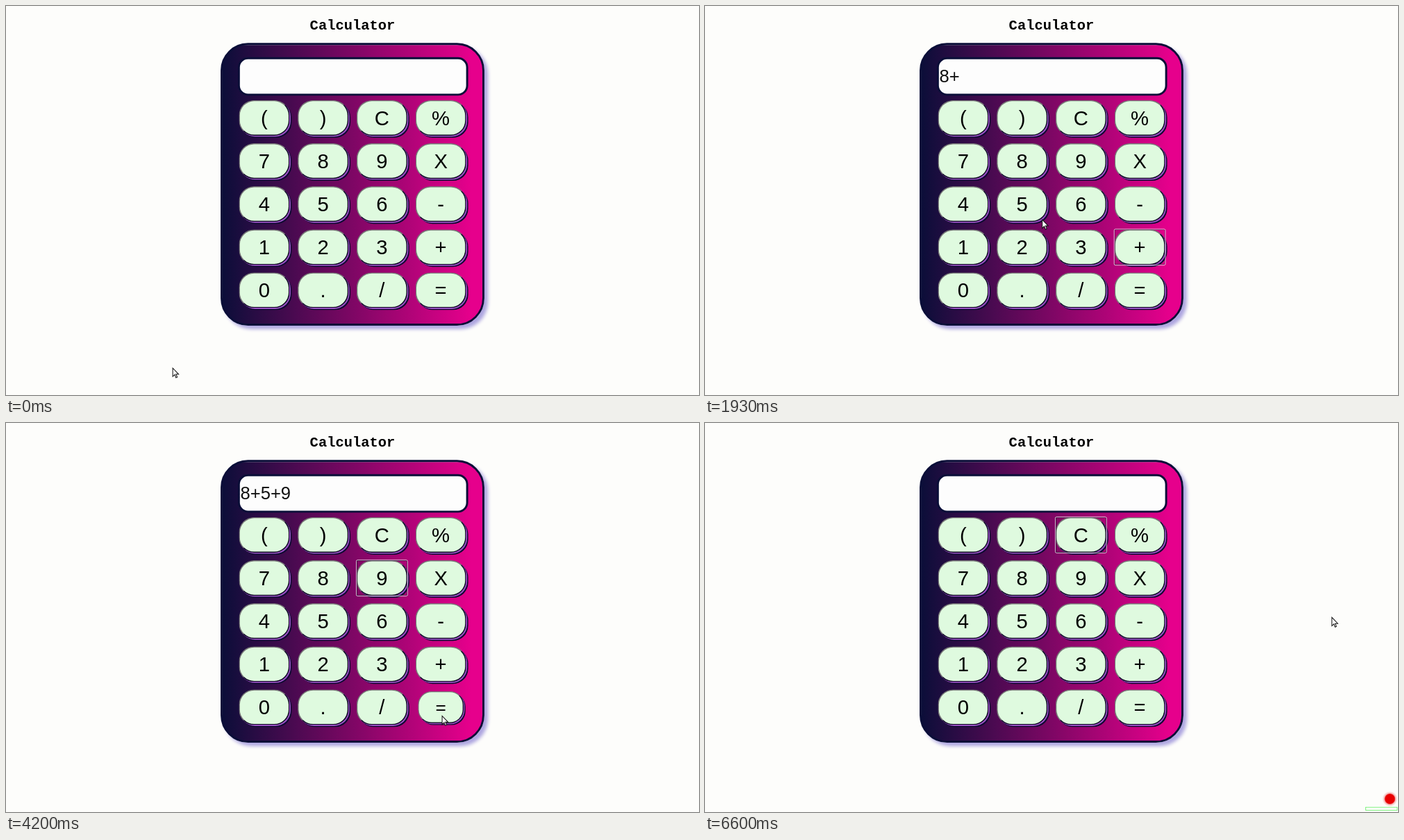
These frames come from a looping animation (998 px wide and 561 px high, 6.73 s). An HTML page:

```html
<!DOCTYPE html>
<html lang="en">
<head>
<meta charset="utf-8">
<title>Calculator</title>
<style>
  html, body { margin: 0; width: 100%; height: 100%; overflow: hidden; background: #fdfdfb; }
  body { position: relative; font-family: "Liberation Sans", Arial, sans-serif; color: #000; }
  body * { position: absolute; box-sizing: border-box; }
  /* laid out on a 1366 x 768 desktop, shown at stage size */
  #desk { width: 1366px; height: 768px; transform: scale(.7306); transform-origin: 0 0; }
  h1 {
    top: 21px; width: 100%; margin: 0; text-align: center;
    font: bold 28px/36px "Liberation Mono", "Courier New", monospace;
  }
  #case {
    left: 423px; top: 73px; width: 520px; height: 558px;
    border: 4px solid #0a0e38; border-radius: 54px;
    background: linear-gradient(to right, #0a0e38, #e6008c 95%) border-box;
    box-shadow: 7px 7px 7px #aea6e0;
  }
  #screen {
    left: 457px; top: 100.5px; width: 454px; height: 76px; padding-left: 1px;
    border: 4px solid #0a0e38; border-radius: 20px; background: #fdfdfd;
    font-size: 35px; line-height: 68px; color: #111;
  }
  .key {
    width: 100px; height: 70px; border: 2px solid; border-radius: 30px;
    border-color: #777 #0c0a20 #0c0a20 #777;
    background: #dffadf; box-shadow: 2px 2px 0 #9a50c4, 4px 4px 0 #0c0a30;
    font-size: 40px; line-height: 66px; text-align: center;
  }
  .hover { transform: scale(.9); }
  .focus::after {
    content: ""; position: absolute; inset: -3px;
    border: 1px solid #fff; border-radius: 3px; box-shadow: inset 0 0 0 1px #180a28;
  }
  #dot {
    left: 1335px; top: 727px; width: 30px; height: 30px;
    background: radial-gradient(closest-side, #e80000 60%, #f0808080 75%, #fdfdfd00);
  }
  #bar { left: 1302px; top: 758px; width: 63px; height: 7px; border: 1px solid #5e5; }
  #cursor { left: 0; top: 0; overflow: visible; }
</style>
</head>
<body>
<div id="desk">
  <h1>Calculator</h1>
  <div id="case"></div>
  <div id="screen"></div>
  <div id="keys"></div>
  <div id="rec"><div id="dot"></div><div id="bar"></div></div>
  <svg id="cursor" width="14" height="22">
    <path d="M.7 .7V17.5L4.6 13.8 7 19.8 9.6 18.6 7.1 12.9H12.3Z" fill="#fff" stroke="#111" stroke-width="1.4"/>
  </svg>
</div>
<script>
const LOOP = 6730, TICK = 1000 / 15;
const $ = id => document.getElementById(id);

const keys = [..."()C%789X456-123+0./="].map((label, i) => {
  const x = 459 + i % 4 * 116, y = 185.5 + Math.floor(i / 4) * 85;
  const el = document.createElement("div");
  el.className = "key";
  el.textContent = label;
  el.style.left = x + "px";
  el.style.top = y + "px";
  $("keys").append(el);
  return { label, x, y, el };
});

// a spot just below the middle of a key
function on(label) {
  const k = keys.find(k => k.label === label);
  return { label, x: k.x + 52, y: k.y + 52 };
}

// pointer trips: leaving tick, arriving tick, goal
const trips = [
  [0, 0, { x: 328, y: 714 }], [2, 2, { x: 1040, y: 410 }],
  [5, 9, on("8")], [16, 23, on("+")], [26, 31, on("5")], [39, 44, on("+")],
  [50, 53, on("9")], [58, 63, on("=")], [71, 74, on("+")],
  [74, 75, { x: 924, y: 571 }], [77, 82, on("C")], [87, 94, { x: 1235, y: 383 }]
];

// a key is pressed once the pointer has rested on it
const REST = 2;
const presses = trips
  .filter(([, end, goal], i) => goal.label && trips[i + 1][0] > end + REST)
  .map(([, end, goal]) => ({ tick: end + REST, label: goal.label }));

function pointer(tick) {
  let x = 0, y = 0;
  for (const [start, end, goal] of trips) {
    if (tick < start) break;
    const k = tick < end ? (tick - start) / (end - start) : 1;
    const ease = 1 - (1 - k) ** 2;
    x += (goal.x - x) * ease;
    y += (goal.y - y) * ease;
  }
  return { x, y };
}

function type(text, label) {
  if (label === "C") return "";
  if (label === "=") return String(text.split("+").reduce((sum, n) => sum + +n, 0));
  return text + label;
}

function draw(time) {
  const tick = Math.floor((time % LOOP + 5) / TICK);
  const tip = pointer(tick);
  const seen = pointer(Math.max(0, tick - 1));  // hover trails the pointer
  const done = presses.filter(p => p.tick <= tick).map(p => p.label);
  $("cursor").style.transform = `translate(${tip.x}px, ${tip.y}px)`;
  $("screen").textContent = done.reduce(type, "");
  $("rec").style.display = tick >= 97 ? "" : "none";
  for (const { label, x, y, el } of keys) {
    const over = seen.x > x && seen.x < x + 100 && seen.y > y && seen.y < y + 70;
    el.classList.toggle("hover", over);
    el.classList.toggle("focus", label === done.at(-1));
  }
}

let start;
function frame(now) {
  start ??= now;
  draw(now - start);
  requestAnimationFrame(frame);
}
draw(0);
requestAnimationFrame(frame);
</script>
</body>
</html>
```
